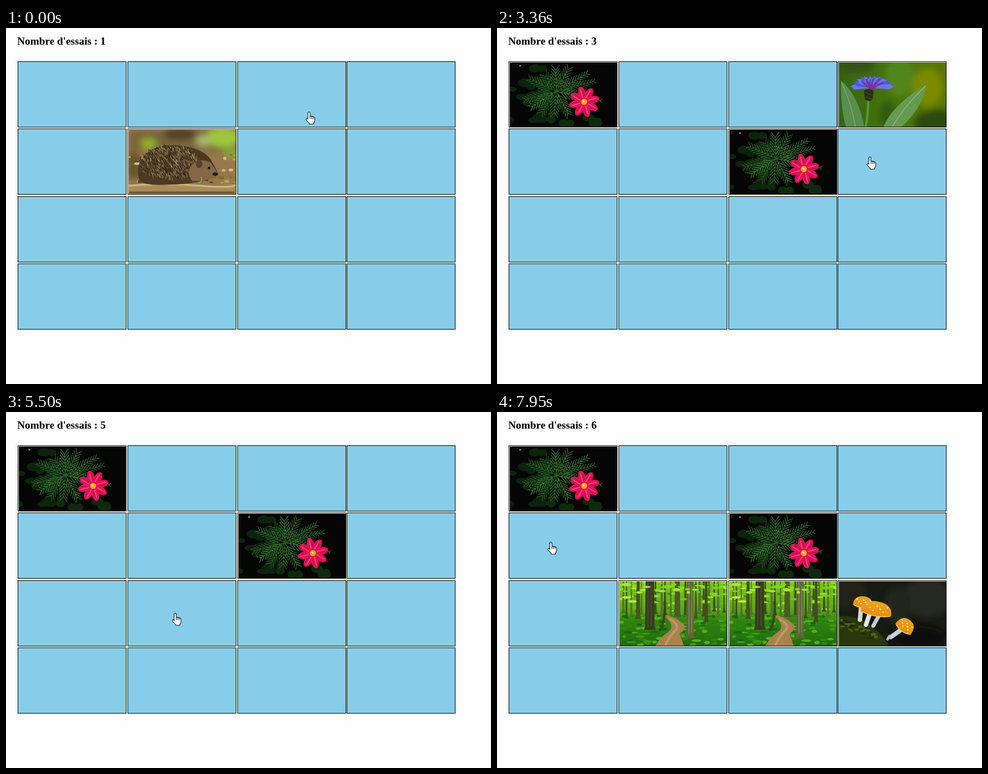
Animation, 874 px wide and 641 px high, one loop 8 s. Source, as an HTML page:

```html
<!DOCTYPE html>
<html lang="fr">
<head>
<meta charset="utf-8">
<title>Memory</title>
<style>
html, body { margin: 0; width: 100%; height: 100%; overflow: hidden; background: #fefefe; }
svg { display: block; }
text { font: bold 19.25px "Liberation Serif", "Times New Roman", serif; fill: #000; }
</style>
</head>
<body>
<svg id="stage" width="874" height="641" viewBox="0 0 874 641">
  <defs>
    <clipPath id="frame"><path d="M0 0H193V116H0Z"/></clipPath>
    <filter id="soft" x="-30%" y="-30%" width="160%" height="160%"><feGaussianBlur stdDeviation="6"/></filter>
    <linearGradient id="meadow"><stop offset="0" stop-color="#35650f"/><stop offset=".5" stop-color="#48750c"/><stop offset="1" stop-color="#597504"/></linearGradient>
    <linearGradient id="wood" x2="0" y2="1"><stop offset="0" stop-color="#7cc916"/><stop offset=".45" stop-color="#5aa713"/><stop offset=".6" stop-color="#2f850d"/><stop offset="1" stop-color="#1f6b0c"/></linearGradient>
    <linearGradient id="cap" x2="0" y2="1"><stop offset="0" stop-color="#f0a51c"/><stop offset="1" stop-color="#e88a12"/></linearGradient>
  </defs>
  <text x="20.2" y="30" id="tries"></text>
  <g id="board"></g>
  <path id="hand" fill="#fff" stroke="#111" stroke-width="1.1" stroke-linejoin="round"
    d="M-2 2.3a2 2 0 0 1 4 0V8q1.6-1 3 .4q1.8-.9 2.8.7q2.2-.4 2.6 1.9V15q0 3-2 5V22H.8V21L-5 14.5q-.9-2.4 1.2-2.7L-2 13.2ZM2 8V12.500M5 8.500V12.500M7.800 9.500V12.500"/>
</svg>
<script>
const NS = 'http://www.w3.org/2000/svg';
const $ = id => document.getElementById(id);

let seed = 7;
const rnd = (a, b) => {
  seed = (seed * 16807) % 2147483647;
  return a + (b - a) * seed / 2147483647;
};
const join = (n, fn) => Array.from({ length: n }, (_, i) => fn(i)).join('');
const rect = (x, y, w, h, fill) => `<rect x="${x}" y="${y}" width="${w}" height="${h}" fill="${fill}"/>`;
const oval = (x, y, rx, ry, fill, more = '') => `<ellipse cx="${x}" cy="${y}" rx="${rx}" ry="${ry}" fill="${fill}" ${more}/>`;
const shape = (d, fill) => `<path d="${d}" fill="${fill}"/>`;
const line = (d, color, w) => `<path d="${d}" fill="none" stroke="${color}" stroke-width="${w}" stroke-linecap="round"/>`;
const blur = s => `<g filter="url(#soft)">${s}</g>`;
const turn = (x, y, a, s) => `<g transform="translate(${x} ${y}) rotate(${a})">${s}</g>`;

// A stalk with slim needles on both sides, growing along +x.
const frond = len => line(`M0 0H${len}` + join(Math.floor(len / 6), i => {
  const x = 8 + i * 6, r = 13 - i * .8;
  return `M${x} 0l${r} ${-r * .75}M${x} 0l${r} ${r * .75}`;
}), `hsl(${rnd(108, 120)} 45% ${rnd(22, 36)}%)`, 1.4);

function cosmos() {
  const leaves = join(24, () => oval(rnd(0, 65), rnd(5, 112), rnd(6, 14), rnd(4, 11), '#0c230c')) +
    join(7, () => oval(rnd(75, 165), rnd(88, 112), rnd(7, 13), 7, '#0d2a0c'));
  const fronds = [[165, 55], [148, 52], [125, 42], [205, 48], [-92, 38], [-62, 42], [-30, 62],
    [-15, 68], [12, 80], [62, 46], [95, 40], [-125, 30]]
    .map(([a, n]) => turn(84, 52, a, frond(n))).join('');
  const petals = join(8, i => turn(134, 71, i * 45 - 104, oval(16, 0, 12, 6.6, '#e51059') +
    line('M8 -1H23', '#ff5d8f', 1.3) + line('M6 3H21', '#b70a43', 1)));
  return rect(0, 0, 194, 117, '#040504') + leaves + oval(19, 6, 2, 1.5, '#7c8a7c') +
    fronds + petals + oval(134, 71, 5.5, 5.5, '#dfaf1c') + oval(133, 70, 2, 2, '#f6da50');
}

function hedgehog() {
  const back = blur(rect(0, 0, 194, 38, '#79663a') + oval(36, 25, 14, 10, '#90b22c') + oval(92, 8, 30, 12, '#554325') +
    oval(170, 14, 30, 18, '#9cc83c') + oval(186, 42, 16, 10, '#89a03c') + oval(10, 65, 18, 25, '#69552f') + oval(135, 20, 14, 10, '#acb570'));
  const litter = join(60, () => oval(rnd(0, 193), rnd(42, 98), rnd(2, 6), rnd(1, 3), ['#b89d6a', '#5b4425', '#cfbd91', '#80663b'][Math.floor(rnd(0, 4))]));
  const spines = color => line(join(220, () => {
    const a = rnd(0, 6.28), r = Math.sqrt(rnd(0, 1));
    return `M${(75 + 56 * r * Math.cos(a)).toFixed(1)} ${(61 + 31 * r * Math.sin(a)).toFixed(1)}l${rnd(-4, 0).toFixed(1)} -4`;
  }), color, .8);
  return rect(0, 0, 194, 117, '#95794b') + back + litter +
    shape('M0 99Q60 94 110 99T194 96V117H0Z', '#a98a58') + line('M0 101Q70 96 130 101T194 99', '#d0b789', 3) + line('M2 113H190', '#66502c', 3) +
    shape('M20 92C8 65 28 30 72 28C112 27 142 39 150 58Q156 66 161 80Q158 88 142 89Q120 98 75 99Q30 102 20 92Z', '#4b3a22') +
    spines('#bda77a') + spines('#8e754b') + spines('#281d10') +
    shape('M112 66Q126 49 147 59Q156 70 162 82Q148 92 115 93Q104 80 112 66Z', '#846746') +
    oval(127, 62, 6, 7, '#554330') + oval(145, 69, 2.5, 2.5, '#15100b') + oval(156, 80, 5, 3, '#21170f') +
    line('M126 96Q134 93 131 86', '#90ad32', 2);
}

function cornflower() {
  const petals = join(15, i => {
    const a = -180 + i * 12.8, n = 40 - 20 * Math.sin(-a * Math.PI / 180);
    return turn(60, 44, a, shape(`M0 -2L${n - 7} -5L${n - 4} -1L${n} 0L${n - 5} 3L${n - 9} 5L0 2Z`, i % 2 ? '#4a58dc' : '#6875ee'));
  });
  return rect(0, 0, 194, 117, 'url(#meadow)') +
    blur(oval(110, 25, 25, 35, '#51861a') + oval(160, 45, 28, 35, '#7b8a04') + oval(185, 110, 50, 25, '#2b4a07') + oval(25, 5, 40, 15, '#345315') + oval(88, 93, 16, 25, '#335c09')) +
    shape('M4 33Q35 58 46 117H13Q2 78 4 33Z', '#588e50') + line('M6 38Q22 72 30 116', '#82ad71', 1.2) +
    shape('M158 40Q151 82 112 117H80Q96 76 158 40Z', '#649a52') + line('M156 43Q119 77 96 116', '#9aba7e', 1.3) +
    line('M53 64Q53 95 48 118', '#5c9438', 4) + petals +
    join(7, i => line(`M58 49L${43 + i * 6} ${36 - i % 2 * 5}`, '#842b91', 2.5)) +
    shape('M45 51Q54 45 63 51L61 66Q54 73 47 66Z', '#28301a') + line('M48 54L60 60M48 62L59 66', '#5b552b', 1);
}

function sprout() {
  const leaf = (x, y, a, s = 1) => turn(x, y, a, shape(`M0 0Q${14 * s} -10 ${28 * s} 0Q${14 * s} 10 0 0Z`, '#62a821') + line(`M0 0H${24 * s}`, '#99cb4d', .8));
  return rect(0, 0, 194, 117, '#b9d580') +
    blur(oval(30, 14, 48, 22, '#e7efd2') + oval(108, 35, 32, 36, '#dde9b9') + oval(15, 66, 28, 20, '#d2e2a2') + oval(48, 68, 20, 23, '#8dbb45') +
      oval(183, 35, 22, 48, '#81b044') + oval(156, 72, 25, 18, '#c3da83') + oval(92, 78, 30, 14, '#a9cc64')) +
    shape('M0 99Q25 91 50 97Q80 99 94 91Q116 80 140 93Q168 101 194 92V117H0Z', '#498915') +
    shape('M82 98Q115 77 146 96L130 106H92Z', '#356710') +
    join(100, () => oval(rnd(0, 193), rnd(99, 116), rnd(1.5, 3.5), 1.5, rnd(0, 1) < .5 ? '#70ad23' : '#2e6910')) +
    line('M111 90Q118 70 112 51Q94 32 60 27M112 51Q124 31 148 20', '#6da52c', 2.5) +
    leaf(60, 26, 118, .9) + leaf(64, 27, 95, 1.1) + leaf(72, 30, 65, .8) +
    leaf(140, 24, 135, .9) + leaf(148, 20, 75, 1.15) + leaf(144, 20, 50, 1.1) + leaf(128, 34, -25, .75) +
    oval(105, 90, 8, 5, '#874320') + line('M109 98Q109 91 114 88', '#e5d8ac', 2);
}

function forest() {
  const trunk = (x, w, h, fill) => shape(`M${x} 0H${x + w}L${x + w + 1} ${h - 6}L${x + w + 3} ${h}H${x - 3}L${x - 1} ${h - 6}Z`, fill);
  const thin = join(22, i => trunk(4 + i * 8.7 + rnd(-2, 2), rnd(1, 3.5), rnd(54, 70), i % 2 ? '#39531a' : '#55712a'));
  const tufts = (n, y0, y1, colors) => join(n, () => oval(rnd(0, 193), rnd(y0, y1), rnd(3, 9), rnd(1, 3), colors[Math.floor(rnd(0, colors.length))]));
  return rect(0, 0, 194, 117, 'url(#wood)') + tufts(50, 0, 55, ['#a5e233', '#69b81a', '#458d15']) + thin +
    tufts(35, 2, 38, ['#92d824', '#7bc71b', '#b3e94b']) +
    tufts(110, 62, 116, ['#3c9914', '#1c640d', '#2e8511', '#56ad21']) +
    shape('M80 61Q101 63 116 78Q120 87 108 94Q113 107 116 117H64Q72 101 91 88Q99 77 80 61Z', '#a8814f') +
    line('M91 68Q111 80 99 90Q88 101 83 114', '#bf9864', 4) +
    trunk(47, 15, 87, '#353c1b') + line('M51 2V82M57 8V80', '#575634', 1.4) +
    trunk(100, 8, 64, '#4b5a26') + trunk(121, 12, 102, '#5f6538') + line('M125 2V94M130 8V91', '#8c8d59', 1.4) +
    trunk(154, 4, 73, '#3d4e1c') + trunk(31, 5, 68, '#47531d') + line('M81 37Q83 69 73 88', '#3c421d', 4) +
    tufts(20, 4, 20, ['#88d321', '#a8e43c']);
}

function mushrooms() {
  const cap = (x, y, rx, ry, a) => turn(x, y, a, shape(`M${-rx} ${ry * .6}Q${-rx} ${-ry} 0 ${-ry}T${rx} ${ry * .6}Q0 ${ry * 1.25} ${-rx} ${ry * .6}Z`, 'url(#cap)') +
    line(`M${-rx + 3} ${ry * .65}Q0 ${ry * 1.15} ${rx - 3} ${ry * .65}`, '#f7cc61', 1.5) +
    join(7, i => oval(-rx * .65 + i * rx * .22, -ry * .4 + i % 3 * ry * .32, 1.6, 1.2, '#fae8b0')));
  return rect(0, 0, 194, 117, '#151a12') +
    blur(oval(160, 30, 45, 35, '#252c22') + oval(105, 45, 24, 35, '#20271c') + oval(145, 102, 48, 22, '#0d100a') + oval(15, 20, 35, 30, '#202417')) +
    shape('M0 63Q35 59 60 83Q82 97 90 117H0Z', '#28380c') +
    join(35, () => { const x = rnd(3, 68); return oval(x, 66 + x * .38 + rnd(0, 14), rnd(2, 6), rnd(1, 3), rnd(0, 1) < .5 ? '#4d621a' : '#1c2709'); }) +
    line('M40 47L38 69', '#d4d8d5', 8) + line('M56 57L49 78', '#e2e4e1', 8) + line('M72 62L62 80', '#bec8cd', 7) +
    cap(44, 38, 18, 11, 8) + cap(68, 50, 28, 14, 10) +
    line('M111 88L94 100', '#c5d0e1', 8) + line('M91 99L88 104', '#aab9ce', 5) + cap(120, 80, 17, 13, 36);
}

const art = { cosmos, hedgehog, cornflower, sprout, forest, mushrooms };
for (const name in art) {
  const g = document.createElementNS(NS, 'g');
  g.id = name;
  g.setAttribute('clip-path', 'url(#frame)');
  g.innerHTML = art[name]();
  document.querySelector('defs').append(g);
}

// Picture turned up: row, column, name, from, until.
const LOOP = 8000;
const turns = [
  [1, 1, 'hedgehog', 0, 550], [0, 2, 'sprout', 130, 550],
  [1, 2, 'cosmos', 940, LOOP], [0, 0, 'cosmos', 1730, LOOP],
  [0, 3, 'cornflower', 2600, 4030], [1, 3, 'mushrooms', 3510, 4030],
  [1, 0, 'sprout', 4320, 5260], [2, 0, 'hedgehog', 4730, 5260],
  [2, 1, 'forest', 5520, LOOP], [2, 2, 'forest', 6590, LOOP],
  [2, 3, 'mushrooms', 7390, LOOP]
];
const counts = [0, 130, 1730, 3510, 4730, 6590];
// Pointer: time, x, y. It jumps from place to place.
const moves = [
  [0, 546, 151], [270, 546, 160], [410, 547, 190], [550, 548, 230], [680, 549, 255],
  [1090, 420, 150], [1340, 280, 128], [1480, 170, 115], [1610, 103, 112],
  [2040, 260, 140], [2200, 592, 169], [2340, 655, 145], [2470, 680, 128],
  [2850, 679, 145], [2970, 678, 165], [3120, 675, 195], [3240, 673, 220], [3360, 672, 232],
  [3640, 665, 260], [3770, 630, 315], [3900, 480, 325], [4030, 290, 300],
  [4190, 165, 258], [4320, 152, 255], [4450, 153, 311], [4600, 154, 350],
  [4980, 190, 355], [5110, 240, 358], [5260, 280, 360], [5390, 305, 362],
  [5900, 325, 366], [6030, 350, 371], [6160, 390, 375], [6310, 460, 378], [6460, 535, 379],
  [6850, 570, 380], [6990, 620, 378], [7120, 665, 372], [7250, 680, 368],
  [7530, 560, 340], [7670, 350, 290], [7810, 170, 250], [7950, 97, 234]
];

const left = c => Math.round(21 + c * 197.75);
const top_ = r => Math.round(60 + r * 121.25);
$('board').innerHTML = join(16, i => {
  const r = i >> 2, c = i % 4, x = left(c), y = top_(r);
  const edge = (i && c < 3 ? rect(x + 196, y + 2, 1, 117, '#f0f2cc') : '') + (i && r < 3 ? rect(x + 2, y + 119, 194, 1, '#f0f2cc') : '');
  return edge + rect(x, y, 196, 119, '#000') + rect(x + 1, y + 1, 194, 117, '#87cdea');
}) + turns.map(([r, c, name]) => `<g class="up" transform="translate(${left(c) + 1} ${top_(r) + 1})">` +
  rect(0, 0, 194, 117, '#fefefe') + `<use href="#${name}" x="1" y="1"/></g>`).join('');

const ups = document.querySelectorAll('.up');
const start = performance.now();
function draw() {
  const t = (performance.now() - start) % LOOP;
  const [, x, y] = moves.findLast(m => m[0] <= t);
  $('hand').setAttribute('transform', `translate(${x} ${y})`);
  $('tries').textContent = "Nombre d'essais : " + counts.filter(s => s <= t).length;
  turns.forEach(([, , , from, until], i) => {
    ups[i].style.display = t >= from && t < until ? '' : 'none';
  });
  requestAnimationFrame(draw);
}
draw();
</script>
</body>
</html>
```
